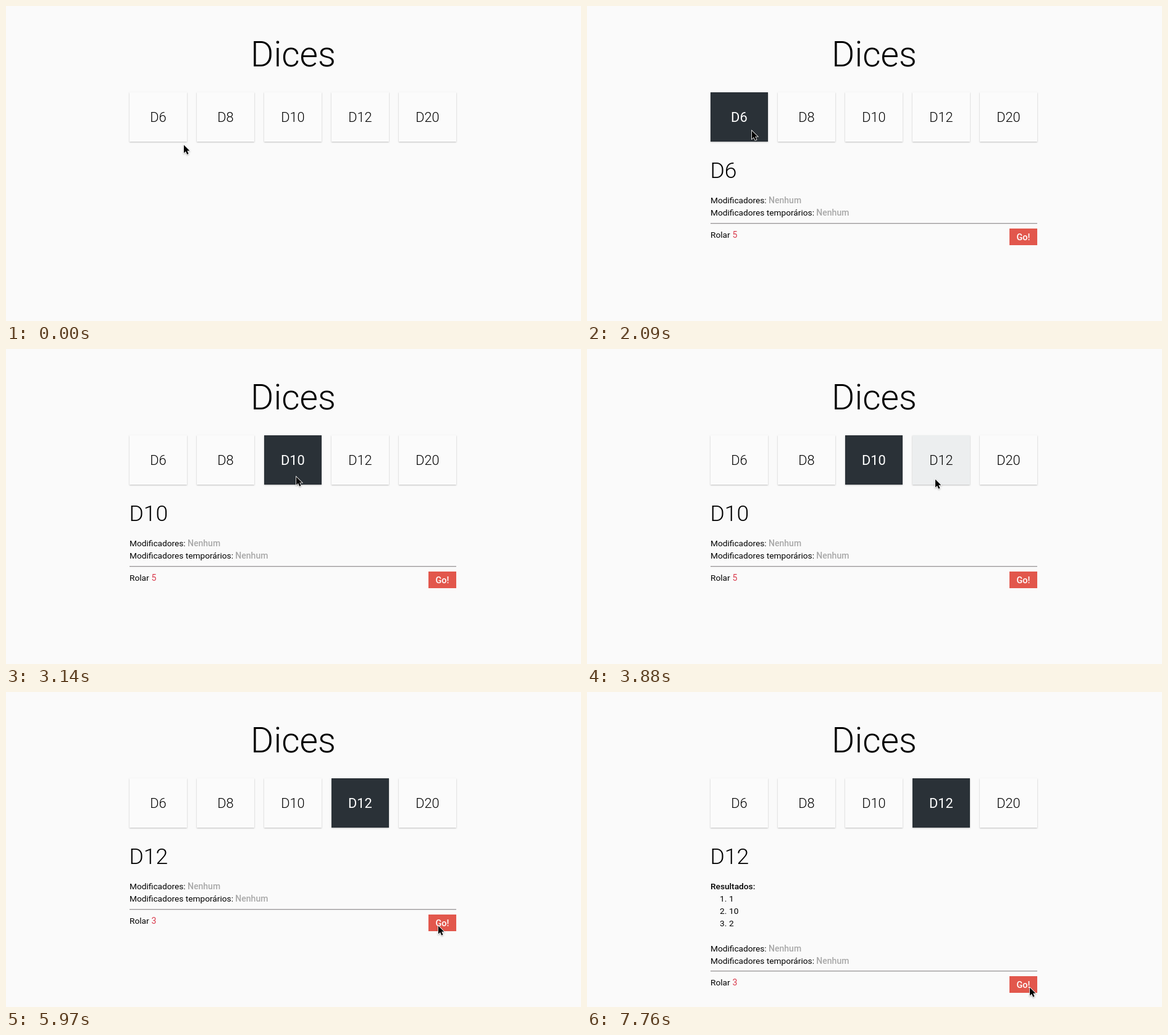
Animation, 931 px wide and 511 px high, one loop 8 s. Source, as an HTML page:

```html
<!DOCTYPE html>
<html lang="pt">
<head>
<meta charset="utf-8">
<title>Dices</title>
<style>
  html, body { margin: 0; width: 100%; height: 100%; overflow: hidden; background: #fafafa; }
  svg { display: block; width: 931px; height: 511px; font: 13.7px Roboto, sans-serif; cursor: default; }
  text { white-space: pre; }
  .title { font-size: 57px; font-weight: 300; }
  .name { font-size: 35.5px; font-weight: 300; }
  .mid { text-anchor: middle; }
  .card rect { fill: #fbfbfb; filter: drop-shadow(0 1px 1px rgba(0, 0, 0, .25)); }
  .card text { font-size: 21.8px; font-weight: 300; }
  .card.hover rect { fill: #eceeef; }
  .card.active rect { fill: #2a3137; }
  .card.active text { fill: #fff; font-weight: 400; }
  .none { font-size: 14px; font-weight: 500; fill: #a8a8a8; }
  .count { font-size: 14px; fill: #d93a4c; }
  .strong { font-weight: 500; }
  .go { font-size: 14.5px; font-weight: 500; fill: #fff; }
  .pointer { filter: drop-shadow(0 1px 1px rgba(0, 0, 0, .3)); }
</style>
</head>
<body>
<svg viewBox="0 0 931 511">
  <text class="title mid" x="465" y="97.5">Dices</text>
  <g id="cards"></g>
  <g id="panel">
    <text id="name" class="name" x="199.5" y="278.5"></text>
    <g id="results">
      <text class="strong" x="200" y="320">Resultados:</text>
      <g id="list"></g>
    </g>
    <g id="mods">
      <text x="200" y="320">Modificadores: <tspan class="none">Nenhum</tspan></text>
      <text x="200" y="340">Modificadores temporários: <tspan class="none">Nenhum</tspan></text>
    </g>
    <g id="foot">
      <rect x="200" y="352" width="529" height="1" fill="#999597"/>
      <rect x="200" y="353" width="529" height="1" fill="#dcdcdc"/>
      <text x="200" y="376">Rolar <tspan id="count" class="count" x="235.5"></tspan></text>
      <rect id="caret" x="235" y="363" width="1" height="16" fill="#777"/>
      <rect x="684" y="361" width="45" height="27" fill="#e2574c"/>
      <text class="go mid" x="706.5" y="380">Go!</text>
    </g>
  </g>
  <path id="arrow" class="pointer" d="M1 1.5V14.5L4 11.7 6.3 16.8 8.5 15.8 6.3 10.8H10.3Z"
        stroke="#fff" stroke-width="1.6" paint-order="stroke"/>
  <g id="beam" fill="none">
    <path d="M-3-7H-2L0-6 2-7H3M0-6V6M-3 7H-2L0 6 2 7H3M-1.5 2H1.5" stroke="#fff" stroke-width="3"/>
    <path d="M-3-7H-2L0-6 2-7H3M0-6V6M-3 7H-2L0 6 2 7H3M-1.5 2H1.5" stroke="#222" stroke-width="1.1"/>
  </g>
</svg>
<script>
const LOOP = 8000, TICK = 149.1;
const dice = ['D6', 'D8', 'D10', 'D12', 'D20'];
const cardX = dice.map((_, i) => Math.round(200 + 109.1 * i));
const el = id => document.getElementById(id);

// Each entry takes effect at its tick and lasts until the next one.
const selection = [[0, ''], [13, 'D6'], [20, 'D10'], [29, 'D12']];
const typed = [[0, '5'], [33, ''], [37, '3']];
const rolls = [[0, []], [42, [4, 9, 6]], [50, [1, 10, 2]]];

// Pointer stops: tick, x, y
const stops = [
  [0, 287, 224], [3, 270, 209], [9, 270, 209], [11, 266, 201], [14, 266, 201],
  [18, 469, 206], [21, 469, 206], [26, 563, 210], [29, 563, 210], [33, 254, 370],
  [37, 254, 370], [39, 620, 387], [40, 699, 378], [42, 699, 378], [45, 731, 462],
  [47, 727, 480], [49, 718, 478], [51, 718, 479], [52, 716, 478], [60, 716, 478]
];

const current = (list, tick) => list.filter(e => e[0] <= tick).pop()[1];

function pointerAt(tick) {
  const i = stops.findIndex(s => s[0] > tick);
  const [t0, x0, y0] = stops[i - 1], [t1, x1, y1] = stops[i];
  const u = (tick - t0) / (t1 - t0), k = u * u * (3 - 2 * u);
  return [Math.round(x0 + (x1 - x0) * k), Math.round(y0 + (y1 - y0) * k)];
}

const show = (id, on) => el(id).setAttribute('visibility', on ? 'inherit' : 'hidden');
const place = (id, x, y) => el(id).setAttribute('transform', `translate(${x} ${y})`);

el('cards').innerHTML = dice.map((d, i) => `<g class="card">
  <rect x="${cardX[i]}" y="140" width="93" height="80"/>
  <text class="mid" x="${cardX[i] + 46.4}" y="188">${d}</text></g>`).join('');
const cards = [...el('cards').children];

function draw(tick) {
  const [x, y] = pointerAt(tick);
  const active = current(selection, tick), roll = current(rolls, tick);

  cards.forEach((card, i) => {
    const over = x >= cardX[i] && x < cardX[i] + 93 && y >= 140 && y < 221;
    card.setAttribute('class', 'card' + (dice[i] === active ? ' active' : over ? ' hover' : ''));
  });

  show('panel', active);
  el('name').textContent = active;
  el('count').textContent = current(typed, tick);
  show('caret', active && tick >= 33 && tick < 36);

  const rolled = roll.length > 0;
  show('results', rolled);
  el('list').innerHTML = roll.map((n, i) =>
    `<text x="215" y="${340 + 20 * i}">${i + 1}.<tspan x="230">${n}</tspan></text>`).join('');
  place('mods', 0, rolled ? 101 : 0);
  place('foot', 0, rolled ? 100 : 0);

  const overField = x > 235 && x < 300 && y > 360 && y < 382;
  show('arrow', !overField);
  show('beam', overField);
  place('arrow', x, y);
  place('beam', x + .5, y + .5);
}

let last = -1;
function frame() {
  const tick = Math.floor((performance.now() % LOOP + 1) / TICK);
  if (tick !== last) draw(last = tick);
  requestAnimationFrame(frame);
}
frame();
</script>
</body>
</html>
```
